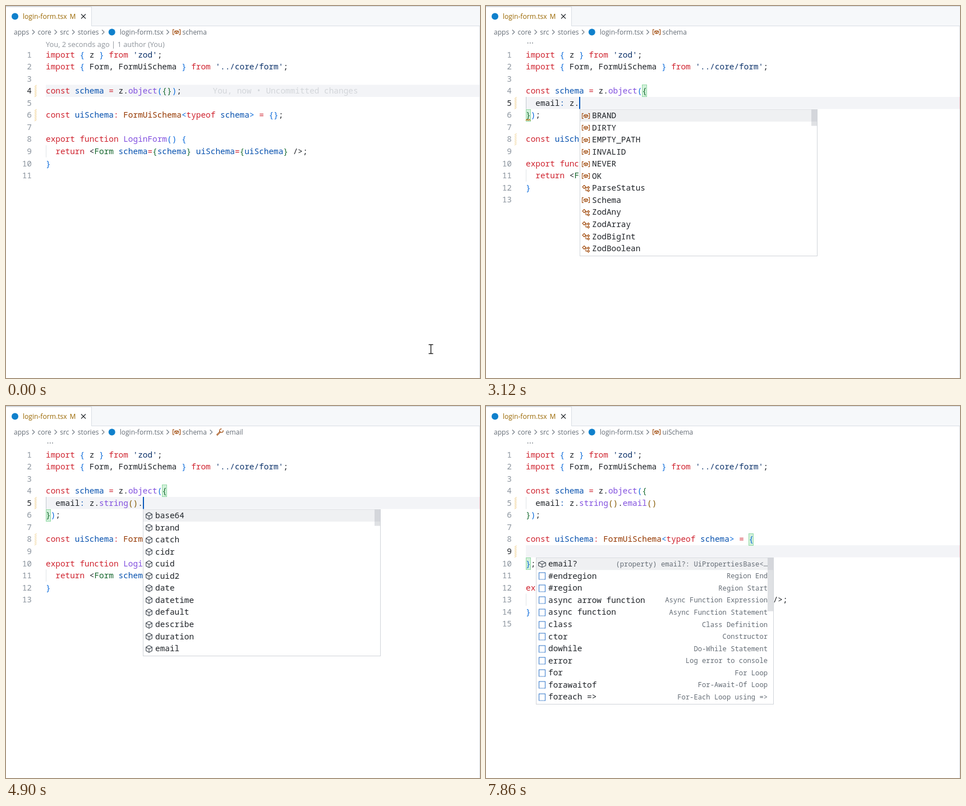
Animation, 845 px wide and 663 px high, one loop 8 s. Source, as an HTML page with a canvas:

```html
<!DOCTYPE html>
<html lang="en">
<head>
<meta charset="utf-8">
<title>Typing a form schema</title>
<style>
html, body { margin: 0; width: 100%; height: 100%; overflow: hidden; background: #fff; }
canvas { display: block; }
</style>
</head>
<body>
<canvas id="stage" width="845" height="663"></canvas>
<script>
const ctx = document.getElementById('stage').getContext('2d');
const LOOP = 8000, SIZE = 14.4, SMALL = 12.2, CW = SIZE * 0.6, LH = 21.55, LEFT = 71, TOP = 75.8;
const MONO = '"Noto Sans Mono", monospace', UI = '"Open Sans", sans-serif';
const INK = '#1f2328', GREY = '#656d76', BROWN = '#a04a0c', BLUE = '#0969da', REACT = '#0f80cc', SLATE = '#424a53';

// "~x" inside a code string switches the colour; B is bold blue
const COLORS = { d: INK, r: '#cf222e', b: BLUE, s: '#0a3069', c: '#0550ae', f: '#8250df',
  t: '#953800', g: '#116329', n: '#156a2f', o: '#855900', B: BLUE };

const HEAD = ["~rimport ~b{ ~dz ~b} ~rfrom ~s'zod'~d;",
  "~rimport ~b{ ~dForm, FormUiSchema ~b} ~rfrom ~s'../core/form'~d;", ''];
const OBJ = '~rconst ~cschema ~r= ~dz.~fobject~b(~n{', OBJ_END = '~n}~b)~d;';
const UIS = '~rconst ~cuiSchema~r: ~tFormUiSchema~b<~rtypeof ~cschema~b> ~r= ~b{', UIS_END = '~b}~d;';
const TAIL = ['', '~rexport function ~fLoginForm~b() {',
  '  ~rreturn ~d<~gForm ~cschema~r=~n{~cschema~n} ~cuiSchema~r=~n{~cuiSchema~n} ~d/>;', '~b}', ''];

// bursts of evenly spaced keys: text, first key, last key
const BURSTS = [['emai', 1500, 1900], ['l', 2100], [': z', 2370, 2570], ['.', 2860], ['stri', 3330, 3680],
  ['ng(', 3880, 4150], [')', 4420], ['.', 4760], ['emai', 4970, 5300], ['l()', 5500, 5690]];
const TYPED = BURSTS.map(b => b[0]).join('');
const KEYS = BURSTS.flatMap(([s, from, to]) =>
  [...s].map((_, i) => s.length > 1 ? from + (to - from) * i / (s.length - 1) : from));

const ELEMENT = ['var', '~BE~dle~Bm~dent~BI~dnter…', 'interface ElementInternalsvar Ele…'];
const GLOBALS = [ELEMENT, ['var', 'Media~BE~dle~Bm~dent~BA~dud~Bi~doSourceNode'],
  ['var', 'SVGAnimated~BE~dnu~Bm~der~Ba~dt~Bi~don'], ['var', 'SVGF~BE~dI~Bma~dgeElement']];
const ZOD = ('BRAND DIRTY EMPTY_PATH INVALID NEVER OK ParseStatus Schema ZodAny ZodArray ZodBigInt ZodBoolean ' +
  'string strictObject ostring set symbol StringValidation ZodSet ZodString ZodStringCheck ZodStringDef').split(' ');
const METHODS = ('base64 brand catch cidr cuid cuid2 date datetime default describe duration email ' +
  'emoji endsWith isEmail isEmoji').split(' ');
const SNIPPETS = [['field', 'email?', '(property) email?: UiPropertiesBase<…'],
  ...`#endregion|Region End
#region|Region Start
async arrow function|Async Function Expression
async function|Async Function Statement
class|Class Definition
ctor|Constructor
dowhile|Do-While Statement
error|Log error to console
for|For Loop
forawaitof|For-Await-Of Loop
foreach =>|For-Each Loop using =>`.split('\n').map(s => ['snippet', ...s.split('|')])];

const STRING_HINT = ['string(~Bparams?: ({ errorMap?: z.ZodErrorMap |',
  '~Bundefined; invalid_type_error?: string |', '~Bundefined; required_error?: string | undefined;',
  '~Bdescription?: string | undefined; } & { coerce?:', '~Btrue | undefined; }) | undefined~d): z.ZodString'];
const OBJECT_HINT = ['object(~Bshape: { email: any; }~d, params?:',
  'z.RawCreateParams): z.ZodObject<{ email: any; },',
  '"strip", z.ZodTypeAny, { email?: any; }, {', 'email?: any; }>'];
const EMAIL_HINT = ['email(~Bmessage?: errorUtil.ErrMessage |', '~Bundefined~d): z.ZodString'];

const lineTop = n => TOP + (n - 1) * LH;
const colX = c => LEFT + c * CW;

function rect(x, y, w, h, fill) { ctx.fillStyle = fill; ctx.fillRect(x, y, w, h); }

function frame(x, y, w, h, fill, stroke) {
  rect(x, y, w, h, fill);
  ctx.lineWidth = 1;
  ctx.strokeStyle = stroke;
  ctx.strokeRect(x + .5, y + .5, w - 1, h - 1);
}

function line(color, width, ...xy) {
  ctx.strokeStyle = color;
  ctx.lineWidth = width;
  ctx.beginPath();
  for (let i = 0; i < xy.length; i += 2) ctx.lineTo(xy[i], xy[i + 1]);
  ctx.stroke();
}

function dot(x, y, r, color) {
  ctx.fillStyle = color;
  ctx.beginPath();
  ctx.arc(x, y, r, 0, 7);
  ctx.fill();
}

function label(s, x, y, size, color, font = UI, align = 'left') {
  ctx.font = `${size}px ${font}`;
  ctx.fillStyle = color;
  ctx.textAlign = align;
  ctx.fillText(s, x, y);
}

function code(s, x, y) {
  let key = 'd';
  for (const part of s.split(/(~\w)/)) {
    if (part[0] === '~') { key = part[1]; continue; }
    label(part, x, y, (key === 'B' ? 'bold ' : '') + SIZE, COLORS[key], MONO);
    x += part.length * CW;
  }
}

// polygon outline with n corners; a cube also gets spokes to every other corner
function polygon(n, x, y, rx, ry, color, cube) {
  const corner = i => {
    const a = (i / n - .25) * 2 * Math.PI;
    return [x + rx * Math.cos(a), y + ry * Math.sin(a)];
  };
  line(color, 1.1, ...Array.from({ length: n + 1 }, (_, i) => corner(i)).flat());
  if (cube) for (let i = 1; i < n; i += 2) line(color, 1.1, x, y, ...corner(i));
}

const ICONS = {
  method: () => polygon(6, 0, 0, 6.2, 6.2, SLATE, true),
  field: () => polygon(6, 0, 0, 7.4, 5.4, SLATE, true),
  prop: () => polygon(6, 0, 0, 7.4, 5.4, BROWN, true),
  var() {
    polygon(6, 0, 0, 4, 2.8, BROWN, true);
    for (const s of [-1, 1]) line(BROWN, 1.1, 4 * s, -4.5, 6.5 * s, -4.5, 6.5 * s, 4.5, 4 * s, 4.5);
  },
  class() {
    polygon(4, -3, -2.5, 3, 3, BROWN);
    polygon(4, 4.5, -1.5, 2, 2, BROWN);
    polygon(4, 4.5, 4, 2, 2, BROWN);
    line(BROWN, 1.1, 2.5, -1.5, 0, -1.5, 0, 4, 2.5, 4);
  },
  snippet() {
    frame(-6, -6.5, 12, 13, '#fff', '#2f74c8');
    ctx.setLineDash([1, 1]);
    line('#fff', 1, -5, 6, 5, 6);
  },
  wrench() {
    line(BROWN, 2.6, -5.5, 5.5, 1, -1);
    line('#fff', .8, -5, 5, 1.2, -1.2);
    ctx.beginPath();
    ctx.arc(2.5, -2.5, 3.2, -.3, 4.9);
    ctx.strokeStyle = BROWN;
    ctx.lineWidth = 1.2;
    ctx.stroke();
  }
};

function icon(kind, x, y) {
  ctx.save();
  ctx.translate(x, y);
  ICONS[kind]();
  ctx.restore();
}

function popup(row, col, items, thumb) {
  const x = Math.round(colX(col) + .6), y = lineTop(row + 1);
  frame(x, Math.round(y), 424, Math.round(items.length * LH + 3.5), '#fff', '#d0d4d9');
  rect(x + 1, y + 1, 422, LH, '#eff0f2');
  items.forEach(([kind, name, detail], i) => {
    const mid = y + 11.5 + i * LH;
    icon(kind, x + 11, Math.round(mid + .5));
    code(name, x + 22, mid + 5);
    if (detail) label(detail, x + 413, mid + 4.5, SMALL, GREY, MONO, 'right');
  });
  if (thumb) rect(x + 413, y + 1, 10, thumb, 'rgba(140,149,159,.28)');
}

function hint(row, col, texts) {
  const x = Math.round(colX(col)), h = Math.round(texts.length * LH + 10), y = Math.round(lineTop(row)) - h;
  frame(x, y, 434, h, '#fff', '#d5d3d8');
  texts.forEach((s, i) => code(s, x + 6, y + 20.5 + i * LH));
}

// keep the names holding the query, those starting with it first, and mark it
function matches(names, query, kindOf) {
  const q = query.toLowerCase(), at = s => s.toLowerCase().indexOf(q);
  return names.filter(s => at(s) >= 0)
    .sort((a, b) => (at(a) > 0) - (at(b) > 0))
    .slice(0, 12)
    .map(s => {
      const i = at(s), j = i + q.length;
      return [kindOf(s), q ? `${s.slice(0, i)}~B${s.slice(i, j)}~d${s.slice(j)}` : s,
        q && s === 'email' ? '(method) ZodString.email(message?: e…' : ''];
    });
}

function suggestions(n, t) {
  if (n === 3) return GLOBALS;
  if (n === 4) return GLOBALS.slice(0, 3);
  if (n === 5) return [ELEMENT];
  if (n === 8) return [['var', '~Bz', '(alias) namespace z']];
  if (n >= 9 && n <= 15 && t >= 2930)
    return matches(ZOD, TYPED.slice(9, n), s => /^(Zod|Parse)/.test(s) ? 'class' : 'var');
  if (n >= 18 && n <= 23 && t >= 4830)
    return matches(METHODS, TYPED.slice(18, n), s => /^is/.test(s) ? 'prop' : 'method');
}

// text, caret and brackets as a function of time
function editor(t) {
  const n = KEYS.filter(k => k <= t).length;
  const typed = TYPED.slice(0, n) + (TYPED[n - 1] === '(' ? ')' : '');
  const field = '  ' + typed.replace(/(\w+)\(\)/g, '~f$1~o()~d').replace(':', '~c:~d');
  if (t < 1230) return { n, row: 4, col: 25, key: 330, marks: [4, 6],
    boxes: t < 330 ? [] : [[4, 24], [4, 25]],
    lines: [...HEAD, OBJ + OBJ_END, '', UIS + UIS_END, ...TAIL] };
  const top = [...HEAD, OBJ, field, OBJ_END, ''];
  if (t < 7320) {
    const s = { n, marks: [5, 8], lines: [...top, UIS + UIS_END, ...TAIL] };
    if (t >= 6590) return { ...s, row: 8, col: 47, key: 6590, boxes: [[8, 46], [8, 47]] };
    const open = /[()]$/.test(TYPED.slice(0, n)) && typed.lastIndexOf('(') + 2;
    return { ...s, row: 5, col: 2 + n, key: n ? KEYS[n - 1] : 1230,
      boxes: open ? [[5, open], [5, open + 1]] : [[4, 24], [6, 0]] };
  }
  return { n, row: 9, col: 2, key: 7320, marks: [5, 9], boxes: [[8, 46], [10, 0]],
    lines: [...top, UIS, '', UIS_END, ...TAIL] };
}

function breadcrumbs(t) {
  const parts = [['apps'], ['core'], ['src'], ['stories'], ['login-form.tsx', 'file'],
    [t < 6790 ? 'schema' : 'uiSchema', 'var']];
  if (t >= 3480 && t < 6790) parts.push(['email', 'wrench']);
  let x = 14;
  parts.forEach(([s, kind], i) => {
    if (i) {
      line('#6e7781', 1.1, x + 5.7, 42.5, x + 9.7, 46.5, x + 5.7, 50.5);
      x += 15.4;
    }
    if (kind === 'file') dot(x + 8, 46.5, 6, REACT);
    else if (kind) icon(kind, x + 8, 46.5);
    if (kind) x += kind === 'file' ? 22 : 18.5;
    label(s, x, 51, 12, GREY);
    x += ctx.measureText(s).width;
  });
}

function chrome(t) {
  rect(0, 0, 845, 663, '#fff');
  rect(152, 0, 693, 36, '#f6f8fa');
  rect(0, 0, 845, 1, '#d0d7de');
  rect(0, 1, 152, 1, '#d8dbdf');
  rect(152, 1, 1, 35, '#d8dee4');
  rect(152, 35, 693, 1, '#d8dee4');
  rect(844, 36, 1, 627, '#dcdfe3');
  dot(16, 18.5, 6, REACT);
  label('login-form.tsx', 30, 23, 12.1, '#9a6700');
  label('M', 113.5, 23, 12.1, '#9a6700');
  for (const s of [-4, 4]) line(INK, 1.1, 138 - s, 14.5, 138 + s, 22.5);
  breadcrumbs(t);
  if (t < 2370) label(`You, ${t < 1230 ? 2 : 7} seconds ago | 1 author (You)`, LEFT, 72.5, 12.85, '#8f959c');
  else label('…', 72.5, 66.5, 16, '#8f959c');
}

// mouse: eased moves between [time, x, y] stops, hidden outside them
function mouse(t, ...stops) {
  const i = stops.findIndex(s => s[0] > t);
  if (i < 1) return;
  const [t0, x0, y0] = stops[i - 1], [t1, x1, y1] = stops[i], p = (t - t0) / (t1 - t0), e = p * p * (3 - 2 * p);
  const x = Math.round(x0 + (x1 - x0) * e) + .5, y = Math.round(y0 + (y1 - y0) * e) + .5;
  line('#1a1a1a', 1.4, x, y - 8, x, y + 8);
  for (const s of [-8, 8]) line('#1a1a1a', 1.4, x - 4, y + s, x + 4, y + s);
}

function draw(t) {
  const s = editor(t), { n } = s;
  chrome(t);
  rect(LEFT, lineTop(s.row), 773, LH, '#f3f4f7');
  if (t >= 1230) rect(844, lineTop(s.row), 1, LH, '#f0c4cc');

  for (const m of s.marks)
    for (let y = lineTop(m) + 2; y < lineTop(m + 1); y += 3) line('#f3d9a4', 1.2, 51, y + 1.5, 54.5, y - 1.5);
  for (const [row, col] of s.boxes)
    frame(Math.round(colX(col)), Math.round(lineTop(row)), 9, 22, '#d2f0da', '#92daa6');

  s.lines.forEach((text, i) => {
    const y = lineTop(i + 1), active = i + 1 === s.row;
    label(i + 1, 46, y + 15.8, SIZE, active ? INK : '#8c959f', MONO, 'right');
    if (text.startsWith('  ')) rect(LEFT, y, 1, LH, active ? '#c3c8ce' : '#e1e4e8');
    code(text, LEFT, y + 15.8);
  });
  if (t < 1230) label('You, now • Uncommitted changes', 368.5, lineTop(4) + 15.8, SIZE, '#d3d6da', MONO);
  if (t >= 2930 && t < 3680) line('#bf6a00', 1.1, 71, 204, 73, 202, 75, 204, 77, 202, 79, 204);

  if (t >= s.key && (t - s.key) % 1000 < 500)
    rect(Math.round(colX(s.col)), lineTop(s.row), 2, LH, '#0757ba');

  if (t < 6590) {
    const items = suggestions(n, t);
    if (items) popup(5, s.col, items, items.length === 12 && 29);
    if (n === 16 || n === 17 && t < 4490) hint(5, s.col, STRING_HINT);
    if (n >= 20 && n <= 23) hint(5, s.col, OBJECT_HINT);
    if (n >= 24 && t < 5840) hint(5, s.col, EMAIL_HINT);
  }
  if (t >= 7790) popup(9, 2, SNIPPETS, 95);

  mouse(t, [0, 757, 611], [70, 757, 611], [330, 288, 152], [830, 430, 148], [900, 430, 148]);
  mouse(t, [6260, 430, 118], [6590, 478, 239], [6790, 478, 239], [7120, 489, 238], [7320, 489, 238]);
}

function tick() {
  draw(performance.now() % LOOP);
  requestAnimationFrame(tick);
}
tick();
</script>
</body>
</html>
```
